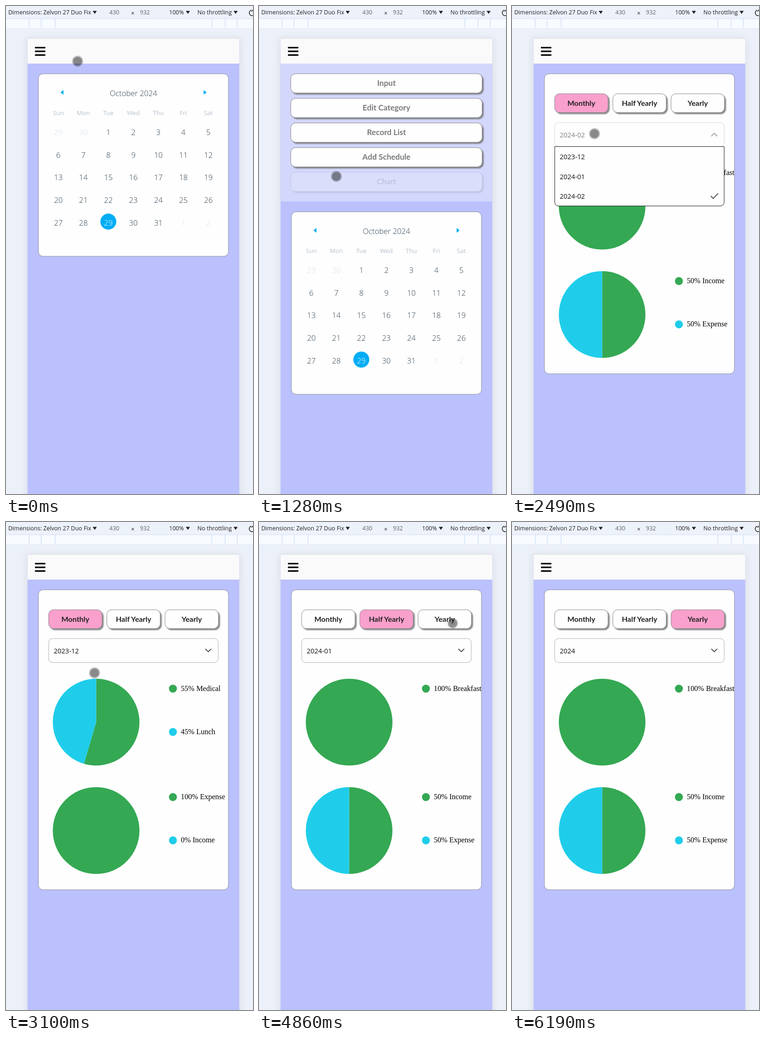
Animation, 533 px wide and 1051 px high, one loop 6440 ms. Source, as an HTML page:

```html
<!DOCTYPE html>
<html lang="en">
<head>
<meta charset="utf-8">
<title>Calendar and charts</title>
<style>
  html, body { margin: 0; width: 100%; height: 100%; overflow: hidden; background: #ecf0f9; }
  svg { display: block; width: 100vw; height: 100vh; }
  .ui { font: 12.5px "Open Sans", "Noto Sans", sans-serif; fill: #202124; }
  .dim { fill: #5f6368; }
  .cal { font: 300 16.4px "Open Sans", "Noto Sans", sans-serif; fill: #2d4150; text-anchor: middle; }
  .week { font: 13.4px "Open Sans", "Noto Sans", sans-serif; fill: #b6c1cd; }
  .off { fill: #d9e1e8; }
  .today { fill: #fff; }
  .btn { font: bold 17px Lato, sans-serif; fill: #7a7a7a; text-anchor: middle; }
  .tab { font: bold 16px Lato, sans-serif; fill: #222; text-anchor: middle; }
  .pick { font: 14.5px "Open Sans", "Noto Sans", sans-serif; fill: #111; }
  .legend { font: 16px "Liberation Serif", "Times New Roman", serif; fill: #000; }
  .line { fill: none; stroke: #222; stroke-width: 1.5; stroke-linecap: round; stroke-linejoin: round; }
</style>
</head>
<body>
<svg id="stage" viewBox="0 0 533 1051" preserveAspectRatio="none"></svg>
<script>
const LOOP = 6440;
const GREEN = '#34a853', CYAN = '#1fcdea', BLUE = '#00adf5', PINK = '#f9a0cc';

const rect = (x, y, w, h, fill, more = '') =>
  `<rect x="${x}" y="${y}" width="${w}" height="${h}" fill="${fill}" ${more}/>`;
const text = (x, y, s, cls, more = '') => `<text x="${x}" y="${y}" class="${cls}" ${more}>${s}</text>`;
const circle = (x, y, r, fill) => `<circle cx="${x}" cy="${y}" r="${r}" fill="${fill}"/>`;
const path = (d, more) => `<path d="${d}" ${more}/>`;
const group = (id, body) => `<g id="${id}">${body}</g>`;
const card = h => rect(70, 146, 410, h, '#fefefe', 'rx="10" stroke="#8b8f9c"');
const button = (x, y, w, h, label, cls, id) => group(id,
  rect(x, y, w, h, '#fefefe', 'rx="10.5" stroke="#85858c" filter="url(#drop)"') +
  text(x + w / 2, y + h / 2 + 5.5, label, cls));

function toolbar() {
  const ticks = [50, 76, 106, 444, 473, 499];
  const arrow = x => path(`M${x} 10.5h9l-4.5 6.5z`, 'fill="#202124"');
  return rect(0, 0, 533, 28, '#edf1fa') + rect(0, 28, 533, 21, '#f7faff') +
    rect(0, 27, 533, 1, '#d3e1f6') + rect(0, 48, 533, 1, '#e4ecf8') +
    ticks.map(x => rect(x - .75, 28, 1.5, 18.5, '#cfe1f8')).join('') +
    text(5, 18, 'Dimensions: Zelvon 27 Duo Fix', 'ui') + arrow(187) +
    text(223, 18, '430', 'ui dim') + text(270, 19.5, '×', 'ui') + text(289, 18, '932', 'ui dim') +
    text(352, 18, '100%', 'ui') + arrow(388) +
    text(413, 18, 'No throttling', 'ui') + arrow(491) +
    path('M533 8.5l-3 3M529 9a6 6 0 0 0 4 11.5', 'class="line"');
}

function calendar() {
  const colX = c => 113 + c * 53.95;
  let s = card(393) +
    path('M124 181v10l-6.5-5z', `fill="${BLUE}"`) + path('M426.5 181v10l6.5-5z', `fill="${BLUE}"`) +
    text(275, 194, 'October 2024', 'cal') + circle(220.8, 464.3, 17.2, BLUE);
  'Sun Mon Tue Wed Thu Fri Sat'.split(' ').forEach((d, c) => s += text(colX(c), 234.5, d, 'cal week'));
  for (let i = 0; i < 35; i++) {
    const n = i < 2 ? 29 + i : (i - 2) % 31 + 1;
    const cls = i < 2 || i > 32 ? ' off' : n === 29 ? ' today' : '';
    s += text(colX(i % 7), 277.7 + Math.floor(i / 7) * 48.8, n, 'cal' + cls);
  }
  return s;
}

function menu() {
  const labels = ['Input', 'Edit Category', 'Record List', 'Add Schedule', 'Chart'];
  return rect(47, 124, 456.5, 297, '#d3d7fb') +
    labels.map((l, i) => button(68.5, 145.8 + i * 53.05, 413, 41.5, l, 'btn', 'menu' + i)).join('');
}

function pie(cy, rows) {
  const cx = 194.5, r = 93.5, share = rows[0][2];
  const at = p => `${cx + r * Math.sin(p * 2 * Math.PI)} ${cy - r * Math.cos(p * 2 * Math.PI)}`;
  const slice = (a, b, fill) =>
    path(`M${cx} ${cy}L${at(a)}A${r} ${r} 0 ${b - a > .5 ? 1 : 0} 1 ${at(b)}z`, `fill="${fill}"`);
  const disc = share === 1 ? circle(cx, cy, r, GREEN) : slice(0, share, GREEN) + slice(share, 1, CYAN);
  return disc + rows.map(([pct, name], i) => {
    const y = cy - 72.2 + i * 93.3;
    return circle(360.2, y, 8.6, i ? CYAN : GREEN) + text(377.3, y + 4.8, `${pct}% ${name}`, 'legend');
  }).join('');
}

function charts() {
  const tabs = ['Monthly', 'Half Yearly', 'Yearly'];
  const check = path('M429.5 409.5l4.5 5 10.5-10.5', 'class="line"');
  const options = ['2023-12', '2024-01', '2024-02'];
  return card(646) +
    tabs.map((l, i) => button(92 + i * 125.6, 189, 115.2, 40.5, l, 'tab', 'tab' + i)).join('') +
    `<g clip-path="url(#card)">` +
    group('breakfast', pie(431, [[100, 'Breakfast', 1]]) +
      pie(664.5, [[50, 'Income', .5], [50, 'Expense', .5]])) +
    group('medical', pie(431, [[55, 'Medical', 6 / 11], [45, 'Lunch']]) +
      pie(664.5, [[100, 'Expense', 1], [0, 'Income']])) + '</g>' +
    group('head', rect(92, 251, 366, 51.7, '#fefefe', 'rx="8.5" stroke="#a9adb0"') +
      text(103, 282.7, '', 'pick', 'id="value"') + path('', 'id="chevron" class="line"')) +
    group('list', path('M92.2 302.7h365.6v120a8 8 0 0 1-8 8h-349.600a8 8 0 0 1-8-8z', 'fill="#fefefe" stroke="#111"') +
      options.map((o, i) => text(103, 330 + i * 42.5, o, 'pick')).join('') + check);
}

const cursor = group('cursor',
  group('idle', '<circle r="9.6" fill="#000" fill-opacity=".46"/>' +
    '<circle r="10.7" fill="none" stroke="#444" stroke-opacity=".32" stroke-width="2.4"/>') +
  group('press', '<circle r="11.8" fill="url(#soft)"/>'));

document.getElementById('stage').innerHTML = `
  <defs>
    <filter id="drop" x="-10%" y="-20%" width="120%" height="160%">
      <feDropShadow dx="3" dy="3" stdDeviation="1" flood-color="#777" flood-opacity=".85"/>
    </filter>
    <filter id="glow" x="-10%" y="-5%" width="120%" height="110%">
      <feDropShadow dx="0" dy="2" stdDeviation="7" flood-color="#3c4043" flood-opacity=".14"/>
    </filter>
    <radialGradient id="soft">
      <stop offset="0" stop-opacity=".5"/><stop offset=".75" stop-opacity=".42"/>
      <stop offset="1" stop-opacity=".05"/>
    </radialGradient>
    <clipPath id="card"><rect x="70" y="146" width="410" height="646"/></clipPath>
  </defs>` +
  rect(0, 0, 533, 1051, '#ecf0f9') +
  rect(46.5, 70, 457, 1061, '#bbc1fc', 'filter="url(#glow)"') + toolbar() +
  rect(46.5, 70, 457, 54, '#fafafa') + rect(46.5, 69.5, 457, 1, '#dfe2e8') +
  [88, 96, 104].map(y => rect(62.5, y, 22.5, 3.3, '#000', 'rx=".6"')).join('') +
  group('menu', menu()) + group('calendar', calendar()) + group('charts', charts()) +
  rect(498.5, 71, 4.5, 915, '#808080', 'rx="2.2" id="scroll"') + cursor;

const el = {};
document.querySelectorAll('#stage [id]').forEach(e => el[e.id] = e);

// [time, x, y]
const route = [
  [0, 154.5, 119], [40, 154, 119], [320, 74, 90], [500, 73, 92], [700, 78, 103], [1140, 167, 367],
  [1900, 167, 367], [2280, 178, 275], [2520, 178, 275], [2800, 191, 325], [3640, 191, 325],
  [3920, 248, 219], [4420, 248, 219], [4840, 418, 218], [5990, 418, 219], [6140, 518, 695], [LOOP, 518, 695]
];
// [time, opacity]
const chartFade = [[0, 1], [1130, 1], [1260, .2], [LOOP, .2]];
const headFade = [[0, 1], [2340, 1], [2430, .4], [2480, .5], [2760, 1], [LOOP, 1]];
const yearlyFade = [[0, 1], [4930, 1], [5060, .2], [5140, .2], [5390, 1], [LOOP, 1]];
const scrollFade = [[0, .5], [1640, .5], [1960, 0], [LOOP, 0]];

function sample(keys, t) {
  let i = 1;
  while (i < keys.length - 1 && keys[i][0] < t) i++;
  const a = keys[i - 1], b = keys[i], p = (t - a[0]) / (b[0] - a[0]);
  return a.slice(1).map((v, k) => v + (b[k + 1] - v) * p);
}
const within = (t, a, b) => t >= a && t < b;
const show = (e, on) => e.style.display = on ? '' : 'none';
const fade = (e, keys, t) => e.style.opacity = sample(keys, t)[0];

function draw(t) {
  const open = within(t, 410, 1340), onCharts = t >= 1340, listed = within(t, 2420, 3040);
  show(el.menu, open);
  show(el.calendar, !onCharts);
  el.calendar.setAttribute('transform', `translate(0 ${open ? 297.2 : 0})`);
  fade(el.menu4, chartFade, t);

  show(el.charts, onCharts);
  show(el.scroll, onCharts);
  fade(el.scroll, scrollFade, t);
  const active = t < 4190 ? 0 : t < 5150 ? 1 : 2;
  for (let i = 0; i < 3; i++) el['tab' + i].firstChild.setAttribute('fill', i === active ? PINK : '#fefefe');
  fade(el.tab2, yearlyFade, t);
  const december = within(t, 3100, 4190);
  show(el.medical, december);
  show(el.breakfast, !december);

  show(el.list, listed);
  fade(el.head, headFade, t);
  el.value.textContent = t < 3040 ? '2024-02' : t < 4190 ? '2023-12' : t < 5150 ? '2024-01' : '2024';
  el.chevron.setAttribute('d', listed ? 'M430.500 280l6-6 6 6' : 'M430.500 273.500l6 6 6-6');

  const pressed = within(t, 400, 560) || within(t, 3900, 4440) || within(t, 4800, 5350);
  show(el.cursor, t < 6180);
  show(el.idle, !pressed);
  show(el.press, pressed);
  el.cursor.setAttribute('transform', `translate(${sample(route, t).join(' ')})`);
}

const start = performance.now();
function tick() {
  draw((performance.now() - start) % LOOP);
  requestAnimationFrame(tick);
}
tick();
</script>
</body>
</html>
```
